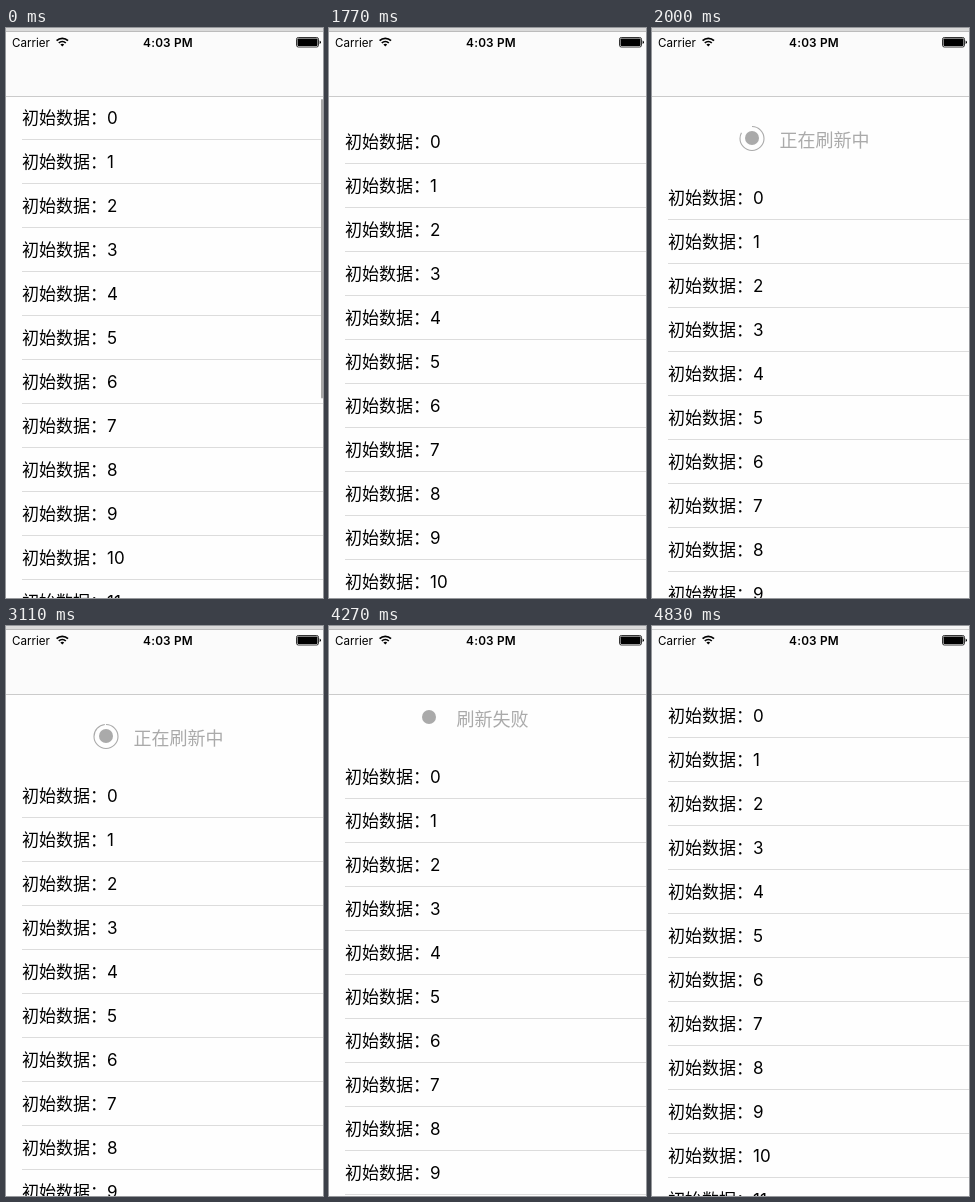
Recreate the animation shown at these times as an HTML page. Size 317 by 570 pixels, loop 4.93 s.

```html
<!DOCTYPE html>
<html lang="zh-CN">
<head>
<meta charset="utf-8">
<title>下拉刷新</title>
<style>
  html, body { margin: 0; width: 100%; height: 100%; overflow: hidden; background: #fefefe; }
  svg { display: block; width: 100%; height: 100%; }
  .cjk { font-family: "Noto Sans CJK SC", "Noto Sans CJK", sans-serif; }
  .latin { font-family: Inter, Roboto, sans-serif; }
</style>
</head>
<body>
<svg viewBox="0 0 317 570" xmlns="http://www.w3.org/2000/svg">
  <rect width="317" height="570" fill="#fefefe"/>
  <g id="header" fill="#aaa">
    <circle id="ring" cx="100" cy="110.5" r="12" fill="none" stroke="#aaa" stroke-width="1.1"
            pathLength="1" transform="rotate(-90 100 110.5)"/>
    <circle cx="100" cy="110" r="7"/>
    <text id="status" class="cjk" x="127.5" y="118.5" font-size="18"></text>
  </g>
  <g id="rows" font-size="17" fill="#000"></g>
  <rect id="bar" x="315" y="71" width="2" height="299.5" rx="1" fill="#a8a8a8"/>

  <rect width="317" height="68" fill="#fbfbfb"/>
  <rect y="68" width="317" height="1" fill="#cbcbcb"/>
  <rect id="edge" width="317" height="3"/>
  <rect id="edgeLine" y="3" width="317" height="1"/>
  <g class="latin" font-size="12">
    <text x="6" y="18.5" font-size="11.6">Carrier</text>
    <text x="162" y="18.5" font-size="11.8" font-weight="600" letter-spacing=".2" text-anchor="middle">4:03 PM</text>
  </g>
  <g fill="none" stroke="#000" stroke-width="1.7">
    <path d="M50.6 12.7a8.1 8.1 0 0 1 11.4 0"/>
    <path d="M52.8 15a5 5 0 0 1 7 0"/>
    <path d="M54.4 16.6a2.7 2.7 0 0 1 3.8 0L56.3 18.6z" fill="#000" stroke="none"/>
  </g>
  <rect x="290.5" y="9.5" width="22" height="9.5" rx="1.8" fill="#fff" stroke="#000" stroke-width=".8"/>
  <rect x="291.5" y="10.5" width="20" height="7.5" rx=".8"/>
  <path d="M313.6 12.6q1.4 .5 1.4 1.7t-1.4 1.7z"/>
</svg>
<script>
const LOOP = 4930, STEP = 58.1, PULL = 1770;
const OPEN = 80, SLIDE = 212, SPIN = 350;
const SPIN_START = 1712, FAIL = 3215, CLOSE = 4201, CLOSED = 4375;

const $ = id => document.getElementById(id);
const header = $("header"), ring = $("ring"), status = $("status");
const rows = $("rows"), bar = $("bar"), edge = $("edge"), edgeLine = $("edgeLine");

rows.innerHTML = Array.from({ length: 12 }, (_, i) => {
  const y = 44 * i;
  return `<text class="cjk" x="16" y="${y + 95.5}">初始数据：<tspan class="latin" x="101">${i}</tspan></text>` +
    `<rect x="16" y="${y + 111}" width="301" height="1" fill="#dcdcdc"/>`;
}).join("");

function ease(x) {
  const p = Math.min(1, Math.max(0, x));
  return p * p * (3 - 2 * p);
}

// The screen refreshes at a fixed step once the pull begins.
function snap(t) {
  return PULL + STEP * Math.floor((t - PULL) / STEP + 0.1);
}

function offsetAt(t) {
  if (t < PULL || t >= CLOSED) return 0;
  return Math.round(OPEN * (ease((t - PULL + 77) / SLIDE) - ease((t - CLOSE) / SLIDE)));
}

function barOpacity(t) {
  return t < 770 ? 1 : Math.max(0, 0.75 - 0.25 * Math.floor((t - 770) / 76));
}

function draw(t) {
  const now = t < PULL ? t : snap(t + 0.01);
  const y = offsetAt(now);
  const failed = now >= FAIL;
  const arc = Math.max(0, now - SPIN_START) / SPIN % 1;

  rows.setAttribute("transform", `translate(0 ${y})`);
  header.setAttribute("transform", `translate(0 ${y - OPEN})`);
  status.textContent = failed ? "刷新失败" : "正在刷新中";
  ring.setAttribute("stroke-dasharray", `${arc} 2`);
  ring.setAttribute("opacity", failed ? 0 : 1);
  bar.setAttribute("opacity", barOpacity(t));

  const light = t >= 4830;
  edge.setAttribute("fill", light ? "#f6f6f6" : "#dadada");
  edgeLine.setAttribute("fill", light ? "#d0d0d0" : "#bcbcbc");
}

const start = performance.now();
function tick() {
  draw((performance.now() - start) % LOOP);
  requestAnimationFrame(tick);
}
tick();
</script>
</body>
</html>
```
